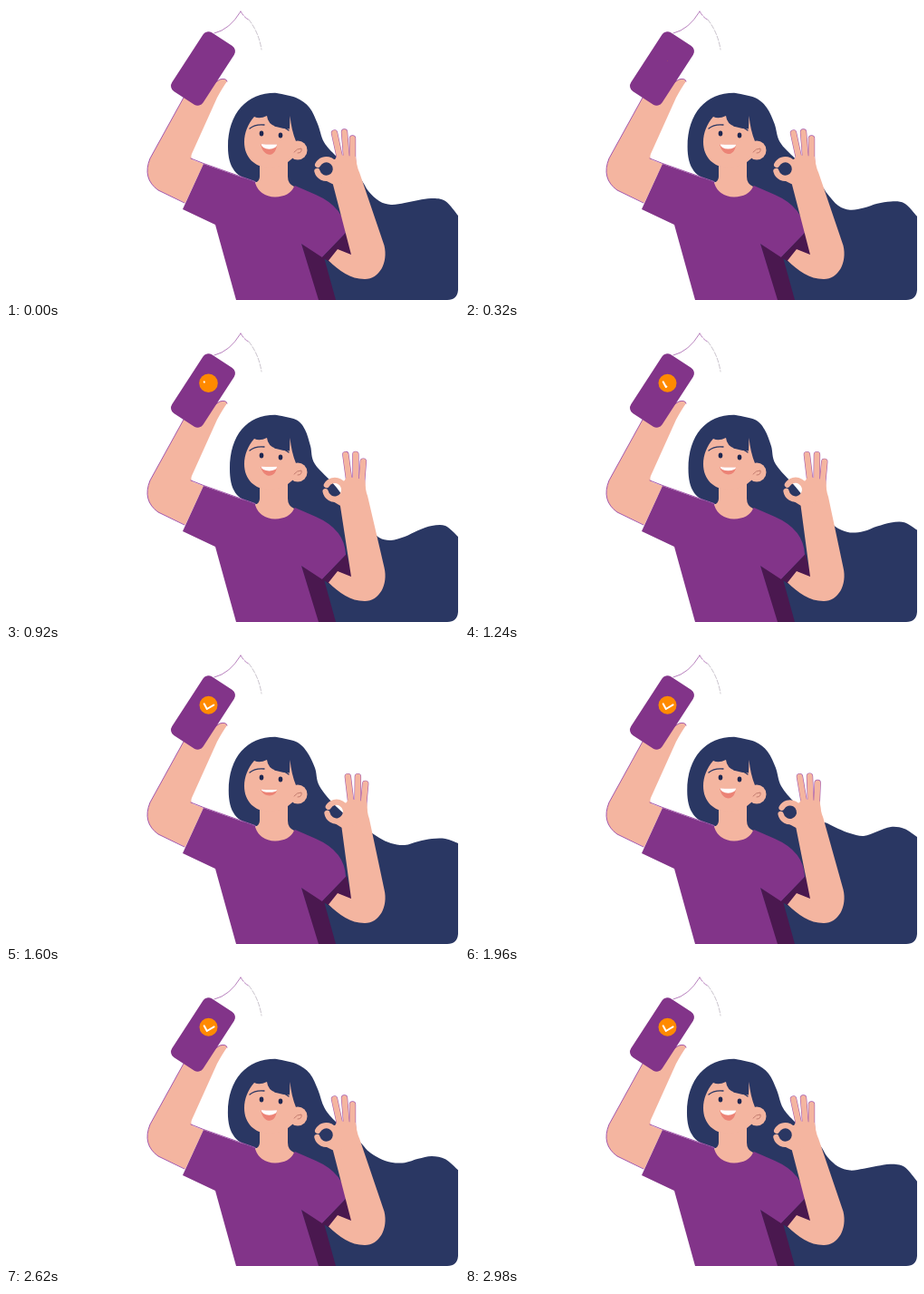
These frames come from a looping animation (500x324 px, 3000 ms). An HTML page with a canvas:

```html
<!DOCTYPE html>
<html lang="en">
<head>
<meta charset="utf-8">
<title>Phone selfie</title>
<style>
html, body { margin: 0; width: 100%; height: 100%; overflow: hidden; background: #fff; }
canvas { display: block; width: 500px; height: 324px; }
</style>
</head>
<body>
<canvas id="stage" width="500" height="324"></canvas>
<script>
const ctx = document.getElementById('stage').getContext('2d');
const LOOP = 3000;
const NAVY = '#2a3763', PURPLE = '#823489', DARK = '#4a184f', SKIN = '#f4b5a0', EDGE = '#a458ad', ORANGE = '#ff8a00';

// Hair pose: three x of the upper edge, y at each of WAVE_X, then mouth height
const TIMES = [0, 600, 920, 1600, 1960, 2280];
const WAVE_X = [365, 390, 400, 412, 425, 440, 455, 470, 485, 499];
const POSES = [
  [335, 344, 351, 166, 189, 204, 215, 219, 217, 214, 212, 215, 231, 12],
  [331, 339, 344, 172, 199, 210, 224, 229, 227, 220, 217, 218, 230, 10],
  [330, 336, 341, 176, 212, 219, 231, 234, 230, 223, 218, 218, 230, 10.5],
  [332, 341, 346, 173, 194, 199, 207, 213, 215, 211, 208, 208, 213, 7],
  [334, 343, 349, 169, 187, 191, 197, 202, 205, 200, 195, 197, 206, 11.5],
  [335, 344, 351, 167, 186, 192, 197, 202, 205, 199, 195, 198, 206, 12]
];

const clamp = v => Math.max(0, Math.min(1, v));
const part = (t, a, b) => clamp((t - a) / (b - a));
const ease = p => (1 - Math.cos(Math.PI * p)) / 2;

// Periodic Hermite interpolation of the poses
function poseAt(t) {
  const n = TIMES.length;
  const time = i => TIMES[(i + n) % n] + Math.floor(i / n) * LOOP;
  const pose = i => POSES[(i + n) % n];
  let i = n - 1;
  while (TIMES[i] > t) i--;
  const t0 = time(i), t1 = time(i + 1), d = t1 - t0, u = (t - t0) / d;
  const u2 = u * u, u3 = u2 * u;
  return pose(i).map((a, k) => {
    const b = pose(i + 1)[k];
    const m0 = (b - pose(i - 1)[k]) / (t1 - time(i - 1)) * d;
    const m1 = (pose(i + 2)[k] - a) / (time(i + 2) - t0) * d;
    return (2 * u3 - 3 * u2 + 1) * a + (u3 - 2 * u2 + u) * m0 + (3 * u2 - 2 * u3) * b + (u3 - u2) * m1;
  });
}

function spline(pts) {
  for (let i = 0; i < pts.length - 1; i++) {
    const a = pts[i - 1] || pts[i], b = pts[i], c = pts[i + 1], d = pts[i + 2] || c;
    ctx.bezierCurveTo(b[0] + (c[0] - a[0]) / 6, b[1] + (c[1] - a[1]) / 6,
      c[0] - (d[0] - b[0]) / 6, c[1] - (d[1] - b[1]) / 6, c[0], c[1]);
  }
}

function fill(d, color) {
  ctx.fillStyle = color;
  ctx.fill(new Path2D(d));
}

function line(d, color, width) {
  ctx.strokeStyle = color;
  ctx.lineWidth = width;
  ctx.stroke(new Path2D(d));
}

function oval(x, y, rx, ry, color) {
  ctx.fillStyle = color;
  ctx.beginPath();
  ctx.ellipse(x, y, rx, ry, 0, 0, 7);
  ctx.fill();
}

function hair(p) {
  const edge = [[297, 95.7], [320, 101], [p[0], 112], [p[1], 130], [p[2], 150]]
    .concat(WAVE_X.map((x, i) => [x, p[3 + i]]));
  const left = 245 + (344 - p[1]) * 0.25;
  ctx.fillStyle = NAVY;
  ctx.beginPath();
  ctx.moveTo(297, 95.7);
  spline(edge);
  ctx.lineTo(499, 313);
  ctx.quadraticCurveTo(498, 324, 487, 324);
  ctx.lineTo(340, 324);
  ctx.lineTo(300, 200);
  ctx.lineTo(276, 194);
  ctx.bezierCurveTo(254, 190, left, 178, left, 155);
  ctx.bezierCurveTo(left, 118, 266, 95.7, 297, 95.7);
  ctx.fill();
}

function raisedArm() {
  fill('M218 174 L207 170 Q203 168 205 163 L233 101 Q239 90 244 83 Q243 79 236 81 L222 88 L196 101 L159 168 Q150 190 168 203 L198 217 Z', SKIN);
  line('M196 101 L159 168 Q150 190 168 203 L197 217', EDGE, 1);
  line('M244 83 Q243 79 236 81 L230 85', EDGE, 1);
  line('M204 168 L218 173.500 L275 193.500', EDGE, 1);
  line('M230 30 Q247 26 259 6', '#b77fbd', 1);
  ctx.setLineDash([5, 2]);
  line('M259 6 Q264 14 268 15', '#b77fbd', 1);
  line('M268 15 Q279 29 282 48', '#c9c3cc', 1);
  ctx.setLineDash([]);
  ctx.save();
  ctx.translate(217.5, 69);
  ctx.rotate(33 * Math.PI / 180);
  ctx.fillStyle = PURPLE;
  ctx.beginPath();
  ctx.roundRect(-20.5, -38.5, 41, 77, 7);
  ctx.fill();
  ctx.restore();
}

function badge(t) {
  const r = 11.4 * ease(part(t, 300, 540)) - 1.4 * ease(part(t, 560, 1080));
  if (r > 0) oval(223.5, 60.8, r, r, ORANGE);
  const p = ease(part(t, 840, 1680));
  if (p <= 0) return;
  const a = [218.7, 59.3], b = [221.8, 65], c = [229.6, 60.4];
  const first = Math.hypot(b[0] - a[0], b[1] - a[1]);
  const second = Math.hypot(c[0] - b[0], c[1] - b[1]);
  const len = p * (first + second);
  const mix = (u, v, k) => ctx.lineTo(u[0] + (v[0] - u[0]) * k, u[1] + (v[1] - u[1]) * k);
  ctx.strokeStyle = '#fff';
  ctx.lineWidth = 2;
  ctx.beginPath();
  ctx.moveTo(...a);
  mix(a, b, clamp(len / first));
  if (len > first) mix(b, c, (len - first) / second);
  ctx.stroke();
}

function body() {
  fill('M326 262 L351 277 L364 324 L344 324 Z', DARK);
  fill('M218 174 L275 194 Q297 220 319 198 L342 208 Q374 222 375 250 L349 277 L326 262 L345 324 L254 324 L231 241 L195 224 Z', PURPLE);
  fill('M376 249 L382 275 L367 269 L357 282 L349 277 Z', DARK);
  fill('M280 168 L280 188 Q280 193 275 195 Q280 210 297 210.500 Q313 210 318 199 Q311 196 311 188 L311 164 Z', SKIN);
}

function face(h) {
  oval(322, 159, 10.5, 10.5, SKIN);
  fill('M263 150 C263 140 267 130 274 122 Q280 125 288 121 Q289 130 298 133 Q305 135 313 135.500 L313.500 121 Q315 137 320 149 L316 168 Q306 178 290 178 C275 178 263 167 263 150 Z', SKIN);
  line('M269 135 Q275 130 285 131', NAVY, 1.3);
  line('M297 132 Q306 132 312 137', NAVY, 1.3);
  oval(282, 140.5, 2.3, 3, '#1d2650');
  oval(303, 142.5, 2.3, 3, '#1d2650');
  line('M318 161 Q321 157 326 157 Q327 162 322 162', '#c47d70', 1);

  const top = 152 + (12 - h) * 0.3;
  ctx.save();
  ctx.beginPath();
  ctx.moveTo(281, top);
  ctx.quadraticCurveTo(290, top + 0.8, 299, top + 0.4);
  ctx.bezierCurveTo(298, top + h * 1.3, 284, top + h * 1.3, 281, top);
  ctx.clip();
  ctx.fillStyle = '#ec8376';
  ctx.fillRect(278, 148, 24, 22);
  oval(290.5, top, 9, h * 0.48, '#fff');
  ctx.restore();
}

function okArm(k) {
  const px = 374, py = 300, angle = 0.093 * k;
  const cos = Math.cos(angle), sin = Math.sin(angle);
  const at = (x, y) => [px + (x - px) * cos - (y - py) * sin, py + (x - px) * sin + (y - py) * cos];
  ctx.fillStyle = SKIN;
  ctx.beginPath();
  ctx.moveTo(...at(362, 169));
  ctx.lineTo(...at(386, 168));
  ctx.bezierCurveTo(...at(387, 174), ...at(388, 179), ...at(390.3, 184));
  ctx.lineTo(417.5, 264);
  ctx.bezierCurveTo(422, 283, 412, 301, 396, 301);
  ctx.bezierCurveTo(380, 301, 368, 292, 356, 280.5);
  ctx.lineTo(366, 268);
  ctx.lineTo(381, 274);
  ctx.lineTo(...at(361, 197));
  ctx.closePath();
  ctx.fill();

  ctx.save();
  ctx.translate(px, py);
  ctx.rotate(angle);
  ctx.translate(-px, -py);
  const fingers = ['M362.500 140 L369 170', 'M373.500 139 L376 170', 'M382.500 146 L382.500 172'];
  fingers.forEach(d => line(d, EDGE, 7.4));
  fingers.forEach(d => line(d, SKIN, 6.2));
  // Ring of thumb and index finger, open where the tips meet
  ctx.lineWidth = 6.3;
  ctx.beginPath();
  ctx.arc(353.5, 179.5, 10.4, Math.PI + 0.45, 3 * Math.PI - 0.25);
  ctx.stroke();
  fill('M362 171 L366 164 L386 166 L388 182 L366 199 L352 192 L360 188 Q365 180 362 171 Z', SKIN);
  ctx.restore();
}

function draw(t) {
  const p = poseAt(t);
  ctx.fillStyle = '#fff';
  ctx.fillRect(0, 0, 500, 324);
  ctx.lineCap = ctx.lineJoin = 'round';
  hair(p);
  raisedArm();
  badge(t);
  body();
  face(p[13]);
  okArm(ease(part(t, 305, 1150)) - ease(part(t, 1570, 2320)));
}

const start = performance.now();
function tick() {
  draw((performance.now() - start) % LOOP);
  requestAnimationFrame(tick);
}
tick();
</script>
</body>
</html>
```
